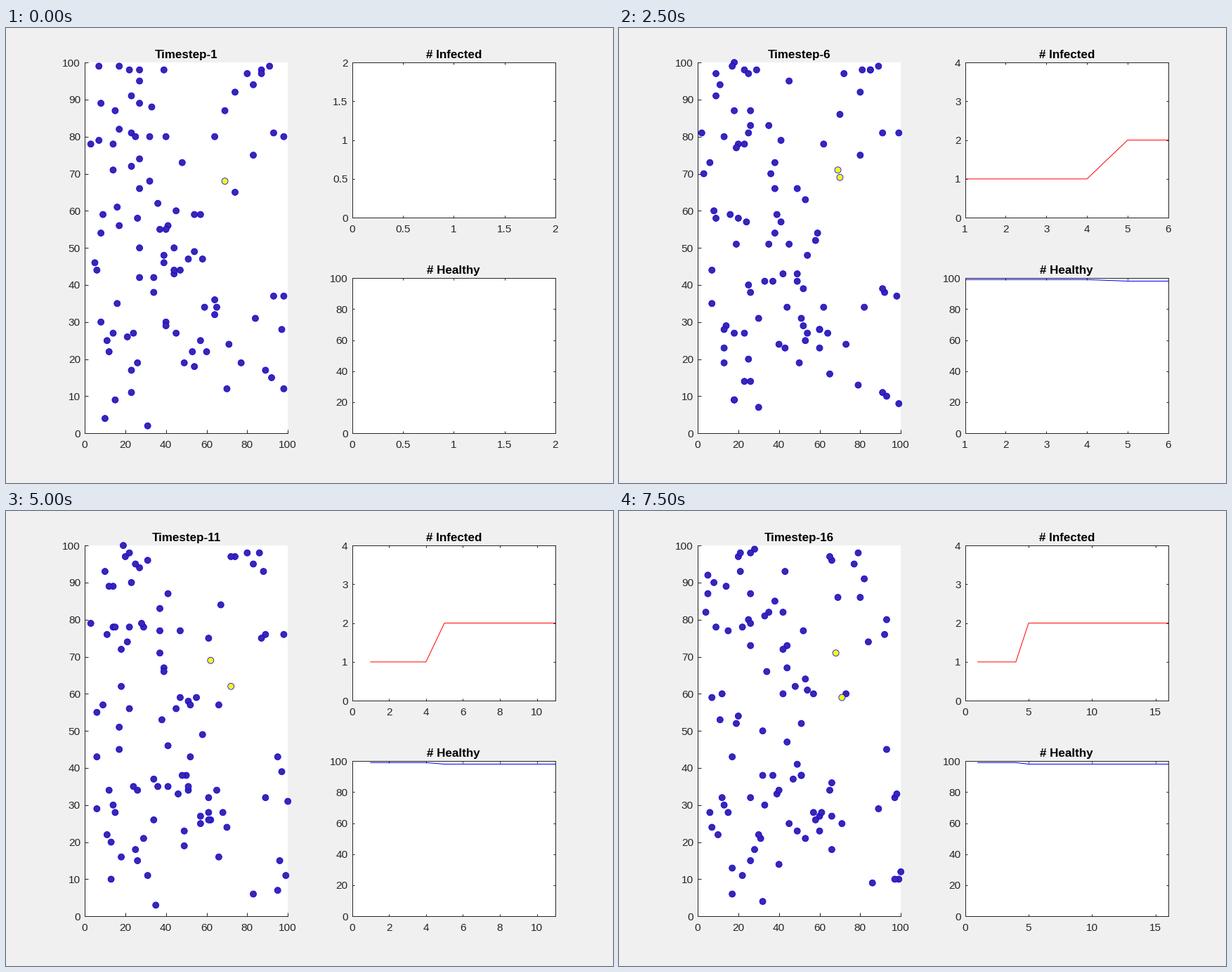
A matplotlib script for the animation above (8000 ms loop, 864 by 648 pixels).

```python
import matplotlib.pyplot as plt
import numpy as np
from matplotlib.animation import FuncAnimation

STEPS = 16
INK = "#262626"
GRAY = "#808080"
BLUE, YELLOW = "#3e26a8", "#f9fb15"

plt.rcParams.update({"font.family": "Liberation Sans", "axes.linewidth": 1,
                     "axes.edgecolor": INK})

# Crowded areas: x, y, number of walkers
GROUPS = [(23, 89, 17), (87, 91, 9), (54, 84, 4), (11, 67, 9), (42, 54, 16),
          (50, 34, 15), (8, 32, 4), (20, 12, 11), (85, 27, 10), (64, 16, 3)]


def bounce(pos):
    """Fold positions that left the field back inside 1..100."""
    pos = np.where(pos < 1, 2 - pos, pos)
    return np.where(pos > 100, 200 - pos, pos)


def random_walks():
    """Positions per step: each walker moves up to 3 cells along each axis."""
    rng = np.random.default_rng(7)
    pos = np.concatenate([np.array([x, y]) + rng.uniform(-16, 16, (count, 2))
                          for x, y, count in GROUPS])
    path = [bounce(np.round(pos))]
    for _ in range(STEPS - 1):
        path.append(bounce(path[-1] + rng.integers(-3, 4, pos.shape)))
    return np.array(path)


def waypoint_walk(xs, ys):
    at = [1, 4, 6, 9, 11, 13, 16]
    n = np.arange(1, STEPS + 1)
    return np.round(np.column_stack([np.interp(n, at, xs), np.interp(n, at, ys)]))


crowd = random_walks()
carrier = waypoint_walk([69, 67, 70, 73, 72, 71, 71], [68, 67, 69, 67, 62, 63, 59])
contact = waypoint_walk([74, 70, 69, 66, 62, 65, 68], [65, 72, 71, 73, 69, 67, 71])
people = np.concatenate([crowd, contact[:, None], carrier[:, None]], axis=1)

days = np.arange(1, STEPS + 1)
infected = np.where(days < 5, 1, 2)
healthy = 100 - infected


def time_axis(n):
    """Lower limit, upper limit and tick spacing for n steps."""
    if n == 1:
        return 0, 2, 0.5
    if n <= 6:
        return 1, n, {2: 0.2, 3: 0.5}.get(n, 1)
    if n <= 12:
        return 0, n if n > 10 else n + n % 2, 2
    return 0, max(15, n), 5


def ticks(lo, hi, step):
    vals = np.arange(lo, hi + 1e-9, step)
    return vals, [f"{v:g}" for v in vals]


fig = plt.figure(figsize=(12, 9), dpi=72, facecolor="#f0f0f0")


def add_plot(left, bottom, height, tick_len, boxed):
    """Axes placed in pixels, measured from the lower left corner."""
    ax = fig.add_axes([left / 864, bottom / 648, 289.2 / 864, height / 648])
    ax.tick_params(direction="in", length=tick_len, width=1, color=INK,
                   labelcolor=INK, labelsize=15.4, top=boxed, right=boxed)
    ax.tick_params(axis="x", pad=9.5)
    ax.tick_params(axis="y", pad=6)
    ax.spines[["top", "right"]].set_visible(boxed)
    return ax


def add_title(ax, text):
    return ax.set_title(text, fontsize=17, fontweight="bold", y=1, pad=6.5)


field = add_plot(112, 70.8, 528.1, 5, False)
top = add_plot(492.6, 377.8, 221.1, 3, True)
low = add_plot(492.6, 70.8, 221.1, 3, True)

field.set(xlim=(0, 100), ylim=(0, 100))
field.set_xticks(range(0, 101, 20))
field.set_yticks(range(0, 101, 10))
low.set_ylim(0, 100)
low.set_yticks(range(0, 101, 20))

title = add_title(field, "")
add_title(top, "# Infected")
add_title(low, "# Healthy")

dots = field.scatter(*people[0].T, s=80, edgecolors="b", linewidths=0.8,
                     clip_on=False, zorder=3)
red, = top.plot([], [], color="r", lw=1)
blue, = low.plot([], [], color="b", lw=1)


def build_toolbar():
    bar = fig.add_axes([0, 0, 1, 1])
    bar.set(xlim=(0, 864), ylim=(648, 0))
    bar.axis("off")

    def stroke(*pts, lw=1.6):
        bar.plot(*zip(*pts), color=GRAY, lw=lw, solid_joinstyle="round")

    def solid(*pts):
        bar.fill(*zip(*pts), color=GRAY, lw=0)

    # Export
    stroke((193, 30), (189, 30), (189, 41), (206, 41), (206, 37))
    stroke((194, 37), (198, 28), (202, 27), (202, 23), (209, 29),
           (202, 35), (202, 31), (194, 37))
    solid((207, 43), (213, 43), (213, 37))
    # Brush
    solid((243, 19), (244, 21), (234, 36), (229, 33))
    solid((228, 34), (233, 37), (231, 41), (226, 43), (219, 43), (224, 39))
    # Data tip
    stroke((257, 22), (274, 22), (274, 43), (257, 43), (257, 37), (251, 32),
           (257, 28), (257, 22))
    for y in (28, 33, 38):
        stroke((261, y), (270, y))
    # Pan: thumb, four fingers, palm
    hand = [(289, 43), (282, 33), (284, 31), (288, 34)]
    for x, y in ((286, 23), (291, 20), (297, 21), (302, 25)):
        hand += [(x, y), (x + 2.5, y), (x + 2, 30)]
    stroke(*hand, (301, 37), (299, 43), (289, 43))
    # Zoom in, zoom out
    for x in (322, 353):
        bar.add_patch(plt.Circle((x, 29), 8.7, fill=False, ec=GRAY, lw=1.6))
        stroke((x + 6.5, 35.5), (x + 13, 44), lw=2.4)
        stroke((x - 5, 29), (x + 5, 29))
    stroke((322, 24), (322, 34))
    # Home
    stroke((374, 33), (386, 20), (398, 33))
    stroke((394, 21), (394, 28))
    stroke((377, 31), (377, 44), (383, 44), (383, 36), (389, 36), (389, 44),
           (395, 44), (395, 31))
    return bar


toolbar = build_toolbar()


def draw(i):
    n = i + 1
    hovering = n in (4, 5)
    toolbar.set_visible(hovering)
    title.set_text("" if hovering else f"Timestep-{n}")

    colors = [BLUE] * people.shape[1]
    colors[-infected[i]:] = [YELLOW] * infected[i]
    dots.set_offsets(people[i])
    dots.set_facecolors(colors)

    lo, hi, step = time_axis(n)
    for ax in (top, low):
        ax.set_xticks(*ticks(lo, hi, step))
        ax.set_xlim(lo, hi)
    ceiling = 2 * infected[i]
    top.set_yticks(*ticks(0, ceiling, ceiling / 4))
    top.set_ylim(0, ceiling)
    red.set_data(days[:n], infected[:n])
    blue.set_data(days[:n], healthy[:n])
    return []


anim = FuncAnimation(fig, draw, frames=STEPS, interval=500, repeat=True,
                     repeat_delay=0, blit=False)
plt.show()
```
